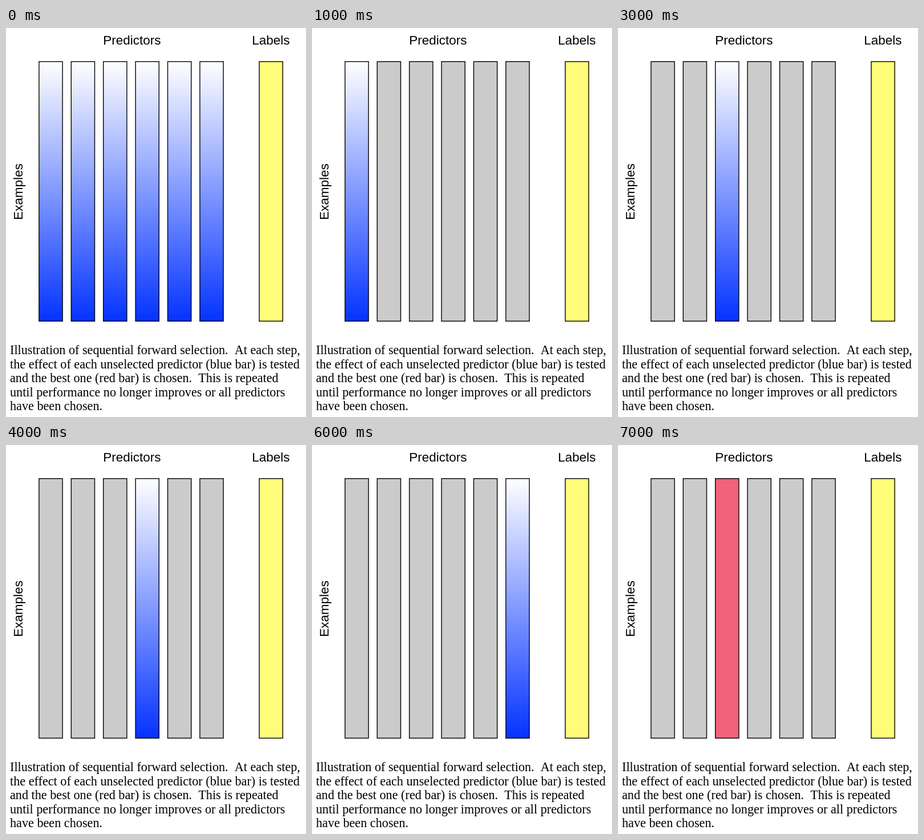
An HTML page with a canvas that plays this animation: 526x681 px, repeating every 8000 ms.

```html
<!DOCTYPE html>
<html lang="en">
<head>
<meta charset="utf-8">
<title>Sequential forward selection</title>
<style>
  html, body { margin: 0; width: 100%; height: 100%; overflow: hidden; background: #fff; }
  canvas { display: block; }
</style>
</head>
<body>
<canvas id="stage" width="526" height="681"></canvas>
<script>
const ctx = document.getElementById('stage').getContext('2d');
const STEP = 1000, LOOP = 8000;
const BARS = 6, BEST = 2;
const LEFT = 57.9, PITCH = 56.4, TOP = 58.8, WIDTH = 41.2, HEIGHT = 454.4;
const GREY = '#cbcbcb', RED = '#f2627a', YELLOW = '#fffc79';

const blue = ctx.createLinearGradient(0, TOP, 0, TOP + HEIGHT);
blue.addColorStop(0, '#ffffff');
blue.addColorStop(1, '#0433ff');

const caption = [
  'Illustration of sequential forward selection.  At each step,',
  'the effect of each unselected predictor (blue bar) is tested',
  'and the best one (red bar) is chosen.  This is repeated',
  'until performance no longer improves or all predictors',
  'have been chosen.'
];

function drawBar(x, fill) {
  ctx.fillStyle = fill;
  ctx.fillRect(x, TOP, WIDTH, HEIGHT);
  ctx.strokeRect(x, TOP, WIDTH, HEIGHT);
}

// Step 0 shows all predictors, steps 1-6 test each one, step 7 picks the best.
function barFill(index, step) {
  if (step === 0 || step === index + 1) return blue;
  return step === BARS + 1 && index === BEST ? RED : GREY;
}

function drawText() {
  ctx.fillStyle = '#000';
  ctx.font = '22.5px "Liberation Sans", Arial, sans-serif';
  ctx.fillText('Predictors', 170.3, 29);
  ctx.fillText('Labels', 431.3, 29);
  ctx.save();
  ctx.translate(29, 336);
  ctx.rotate(-Math.PI / 2);
  ctx.fillText('Examples', 0, 0);
  ctx.restore();
  ctx.font = '22.2px "Liberation Serif", "Times New Roman", serif';
  caption.forEach((line, i) => ctx.fillText(line, 7, 571 + i * 24.5));
}

function draw(time) {
  const step = Math.floor((time % LOOP) / STEP);
  ctx.fillStyle = '#fff';
  ctx.fillRect(0, 0, 526, 681);
  ctx.strokeStyle = '#000';
  ctx.lineWidth = 1.4;
  for (let i = 0; i < BARS; i++) drawBar(LEFT + i * PITCH, barFill(i, step));
  drawBar(444, YELLOW);
  drawText();
}

const start = performance.now();
function tick() {
  draw(performance.now() - start);
  requestAnimationFrame(tick);
}
tick();
</script>
</body>
</html>
```
